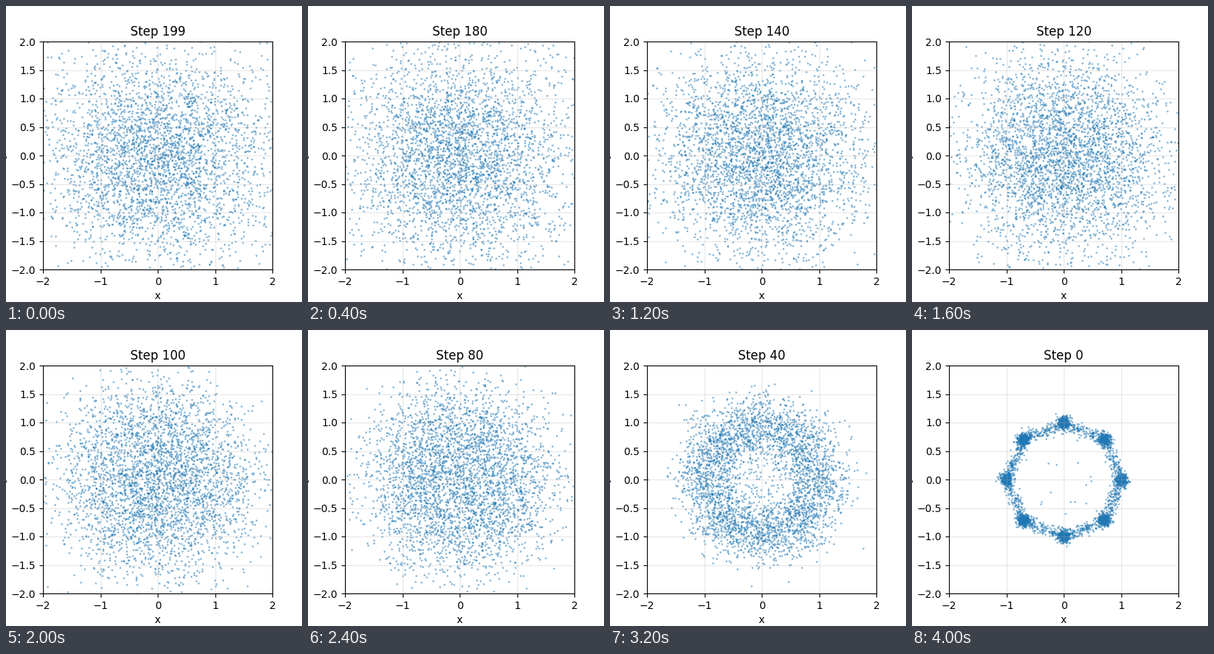
Animation of 400 by 400 pixels, one loop 4200 ms. Source, as a matplotlib script:

```python
import numpy as np
import matplotlib.pyplot as plt
from matplotlib.animation import FuncAnimation

COUNT = 3500
STEPS = [199] + list(range(190, -1, -10))
BETAS = np.linspace(1e-4, 0.02, 200)
rng = np.random.default_rng(7)


def ring_of_clusters(count):
    """Eight clusters on the unit circle, joined by thin bridges, plus strays."""
    corner = rng.integers(0, 8, count)
    along = np.where(rng.random(count) < 0.36, rng.random(count), 0.0)
    angles = np.pi / 4 * np.stack([corner, corner + 1])
    ends = np.stack([np.cos(angles), np.sin(angles)], axis=-1)
    points = ends[0] + (ends[1] - ends[0]) * along[:, None]
    points += rng.normal(0, 0.055, points.shape)
    points[:14] *= rng.uniform(0.25, 0.8, (14, 1))
    return points


def diffuse(points):
    """Noise the points step by step and keep the states that are shown."""
    states = {0: points}
    for step in range(1, 200):
        beta = BETAS[step]
        noise = rng.normal(size=points.shape)
        points = np.sqrt(1 - beta) * points + np.sqrt(beta) * noise
        if step in STEPS:
            states[step] = points
    return states


states = diffuse(ring_of_clusters(COUNT))

fig, ax = plt.subplots(figsize=(4, 4), dpi=100)
dots = ax.scatter(*states[STEPS[0]].T, s=1, alpha=0.4, color="tab:blue")
ax.set(xlim=(-2, 2), ylim=(-2, 2), xlabel="x", ylabel="y")
ax.grid(True, alpha=0.3)
title = ax.set_title("")


def update(frame):
    step = STEPS[frame]
    dots.set_offsets(states[step])
    title.set_text(f"Step {step}")
    return dots, title


anim = FuncAnimation(fig, update, frames=len(STEPS), interval=200,
                     repeat=True, repeat_delay=0)
plt.show()
```
